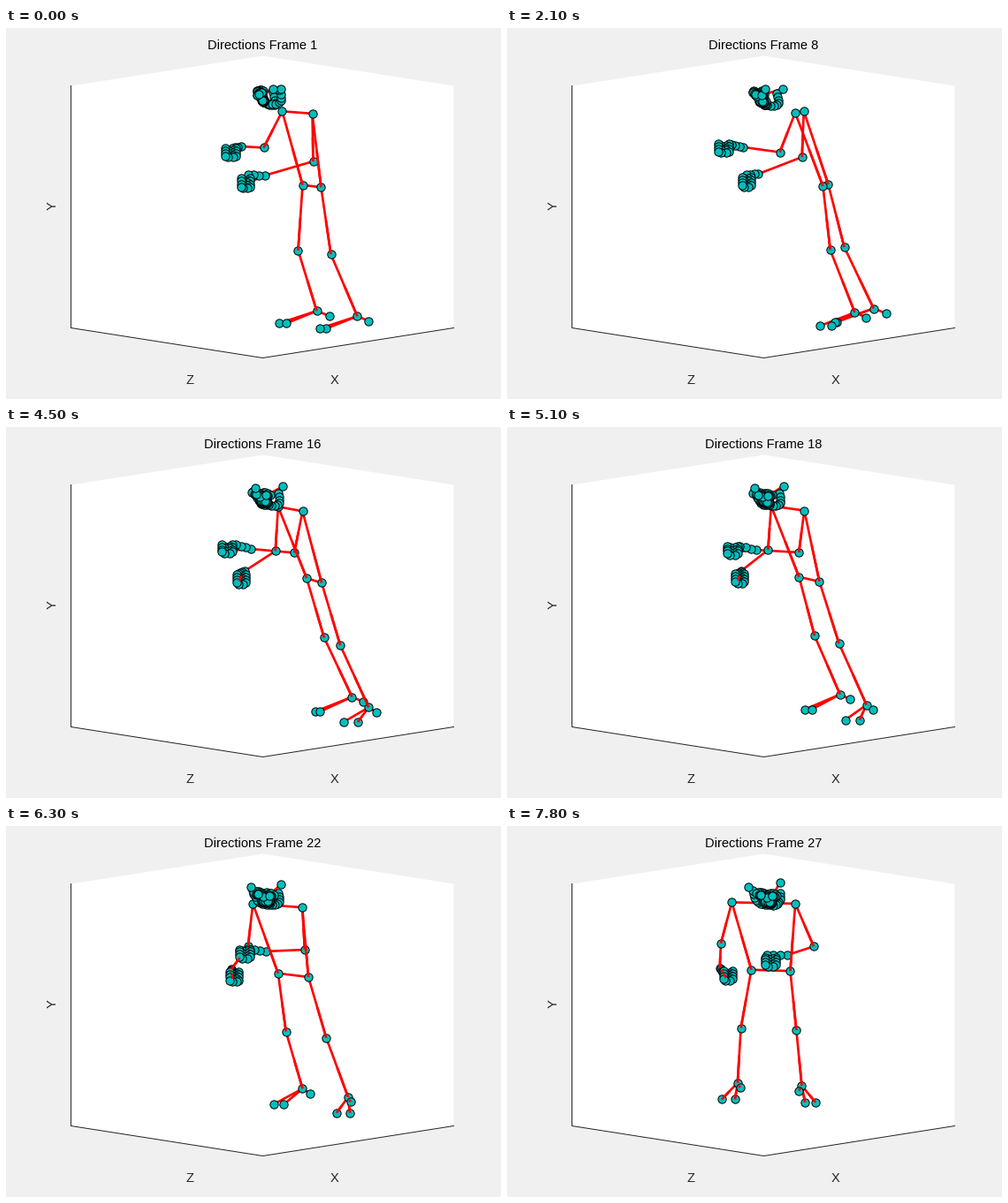
These frames come from a looping animation (560 by 420 pixels, 8000 ms). A matplotlib script:

```python
import numpy as np
import matplotlib.pyplot as plt
from matplotlib.animation import FuncAnimation
from matplotlib.collections import LineCollection

W, H, DPI = 560, 420, 100
PX = 72 / DPI
POSES, STEP, TICK = 27, 300, 100

LIMBS = ("shoulder-elbow elbow-wrist shoulder-hip hip-knee knee-ankle "
         "ankle-heel ankle-toe1 ankle-toe2").split()
BONES = [tuple(f"{s}_{j}" for j in limb.split("-")) for s in "rl" for limb in LIMBS]
BONES += [("r_shoulder", "l_shoulder"), ("r_hip", "l_hip")]


def poly(t, *coefs):
    return sum(c * t**n for n, c in enumerate(coefs))


def polar(degrees, rx, ry=0):
    a = np.radians(degrees)
    return np.array([rx * np.cos(a), ry * np.sin(a)])


def body(t):
    """Joints of trunk, arms and legs while the figure turns to the viewer."""
    yaw = poly(t, -27, 2.4, 0.056)
    lean = 2.6 * np.sin(0.13 * (t - 4))
    p = {}

    def pair(joint, x, y, half, lag=0, tilt=1):
        mid = np.array([poly(t, *x), poly(t, *y)])
        offset = np.array([half * np.sin(np.radians(yaw - lag)), tilt * lean])
        p["r_" + joint], p["l_" + joint] = mid - offset, mid + offset

    pair("shoulder", (330, 0.83, -0.09), (95.6, 0, -0.0125), 37.5)
    pair("hip", (346.5, 4, -0.297, 0.0028), (179, 0, -0.023), 23)
    pair("knee", (349.5, 5.24, -0.2337, -0.00178), (254, -0.5, -0.0165), 34, 6, 1.7)
    pair("ankle", (375, 5.72, -0.168, -0.0064), (323.3, -0.25, -0.036), 40, 8, 2.3)

    p["r_elbow"] = np.array([poly(t, 348, -1.2, -0.11), poly(t, 151, -0.7)])
    p["l_elbow"] = np.array([poly(t, 292, 2.55, -0.016),
                             135.5 + 7 * np.sin(np.pi * t / 27)])
    p["r_wrist"] = np.array([poly(t, 293, -0.9, -0.042), poly(t, 167, -0.24)])
    p["l_wrist"] = np.array([poly(t, 266, 0, 0.02, 0.00215), poly(t, 134, 0, 0.018)])

    toe_drop = np.array([0, poly(t, 14, 0.18)])
    feet = {"r": (yaw + 5, yaw - 8, yaw + 13),
            "l": (yaw + 30, 0.9 * yaw + 29, 0.72 * yaw + 58)}
    for s, (heel, toe1, toe2) in feet.items():
        ankle = p[s + "_ankle"]
        p[s + "_heel"] = ankle + polar(heel, 14) + (0, 5.5)
        p[s + "_toe1"] = ankle - polar(toe1, 43) + toe_drop
        p[s + "_toe2"] = ankle - polar(toe2, 44) + toe_drop
    return p


def ring(u, v, w, ru, rv, count):
    a = np.arange(count) * 2 * np.pi / count
    return np.c_[u + ru * np.cos(a), v + rv * np.sin(a), np.full(count, w)]


def face_template():
    """Landmarks in sideways, downward and forward units of the face."""
    a = np.linspace(0, np.pi, 17)
    parts = [np.c_[np.cos(a), np.sin(a), np.sin(a) ** 4]]
    for s in (-1, 1):
        u = np.linspace(0.18, 0.78, 5)
        arch = 0.47 - 0.05 * np.sin(np.linspace(0, np.pi, 5))
        parts.append(np.c_[s * u, arch, 1.4 - 0.3 * u**2])
        parts.append(ring(s * 0.42, 0.58, 1.28, 0.16, 0.03, 6))
    bridge = np.linspace(0, 1, 4)
    parts.append(np.c_[0 * bridge, 0.55 + 0.2 * bridge, 1.35 + 0.25 * bridge])
    nostril = np.linspace(-0.18, 0.18, 5)
    parts.append(np.c_[nostril, 0 * nostril + 0.8, 1.42 - abs(nostril)])
    parts += [ring(0, 0.92, 1.25, 0.34, 0.07, 12), ring(0, 0.92, 1.25, 0.24, 0.03, 8)]
    return np.vstack(parts)


FACE = face_template()


def head(t):
    """Head joints, and the lines from nose over the eyes to the ears."""
    ear_half = -4.5 + 23 * (1 - np.exp(-t / 7))
    ear_mid = poly(t, 307, -0.6)
    ears = np.array([[ear_mid - ear_half, 69],
                     [ear_mid + ear_half, poly(t, 69, 0, -0.0075)]])
    origin = np.array([294 + 12 * np.exp(-t / 5), poly(t, 72, 0.1)])
    axes = np.array([[0.85 * ear_half, 1.5],
                     [8 * np.cos(np.radians(poly(t, -27, 2.4, 0.056))), 22 - 0.08 * t],
                     [poly(t, -17, 0.62), poly(t, -8, 0.1)]])
    nose, *eyes = origin + np.array([(0, 0.75, 1.6), (-0.42, 0.56, 1.28),
                                     (0.42, 0.56, 1.28)]) @ axes
    lines = [seg for eye, ear in zip(eyes, ears) for seg in ((nose, eye), (eye, ear))]
    return [*(origin + FACE @ axes), nose, *eyes, *ears], lines


def hand(wrist, thumb, palm, rx, ry):
    """Thumb chain and four curled fingers around the palm."""
    thumb, palm = wrist + thumb, wrist + palm
    dots = [wrist + (thumb - wrist) * f for f in (1 / 3, 2 / 3, 1)]
    for finger in range(4):
        for knuckle in range(4):
            shift = ry * 0.7 * (finger - 1.5) / 1.5
            dots.append(palm + polar(60 * knuckle, rx, 0.3 * ry) + (0, shift))
    return dots, [(wrist, thumb), (wrist, palm + (-2, 3))]


def build_pose(t):
    p = body(t)
    right = hand(p["r_wrist"], (poly(t, -19, 0.85), poly(t, -1, 0.22)),
                 (poly(t, -22, 1.2), 8), 5, 6.5)
    left = hand(p["l_wrist"], (poly(t, -10, -0.5), -5 + 0.035 * (t - 14) ** 2),
                (-27 + 0.07 * (t - 15) ** 2, -1 + 0.045 * (t - 13) ** 2), 6, 6)
    face_dots, face_lines = head(t)
    bones = [(p[a], p[b]) for a, b in BONES] + right[1]
    joints = [*p.values(), *face_dots, *right[0], *left[0]]
    nudge = np.array([-1, -0.5])
    # Seen from above, a steep bone passes in front of its lower joint.
    fronts = [(b, (a + b) / 2) for a, b in bones if b[1] - a[1] > abs(b[0] - a[0])]
    return (np.array(bones + left[1] + face_lines) + nudge,
            np.array(fronts) + nudge, np.array(joints) + nudge)


fig = plt.figure(figsize=(W / DPI, H / DPI), dpi=DPI, facecolor="#f0f0f0")
ax = fig.add_axes([0, 0, 1, 1])
ax.set(xlim=(-0.5, W - 0.5), ylim=(H - 0.5, -0.5))
ax.axis("off")

box = [(73, 65), (290, 31), (506, 65), (506, 339), (290, 373), (73, 339)]
ax.add_patch(plt.Polygon(box, facecolor="white", edgecolor="none"))
ax.plot([73, 73, 290, 506], [65, 339, 373, 339], color="#262626", lw=PX)

font = dict(family="Liberation Sans", size=14.67 * PX, ha="center")
for label, x in (("Z", 208), ("X", 371)):
    ax.text(x, 403, label, color="#262626", va="baseline", **font)
ax.text(52, 201, "Y", color="#262626", va="center", rotation=90, **font)
title = ax.text(290, 24, "", color="black", va="baseline", **font)

red = dict(colors="red", linewidths=2.67 * PX)
bone_lines = ax.add_collection(LineCollection([], zorder=3, **red), autolim=False)
front_lines = ax.add_collection(LineCollection([], zorder=5, **red), autolim=False)
dots, = ax.plot([], [], "o", ms=9.3 * PX, mfc="#00bfbf", mec="black",
                mew=PX, zorder=4)


def update(tick):
    pose = min(tick * TICK // STEP, POSES - 1)
    bones, fronts, joints = build_pose(pose)
    bone_lines.set_segments(bones)
    front_lines.set_segments(fronts)
    dots.set_data(joints[:, 0], joints[:, 1])
    title.set_text(f"Directions Frame {pose + 1}")
    return bone_lines, front_lines, dots, title


anim = FuncAnimation(fig, update, frames=80, interval=TICK, repeat=True,
                     repeat_delay=0, blit=False)
plt.show()
```
